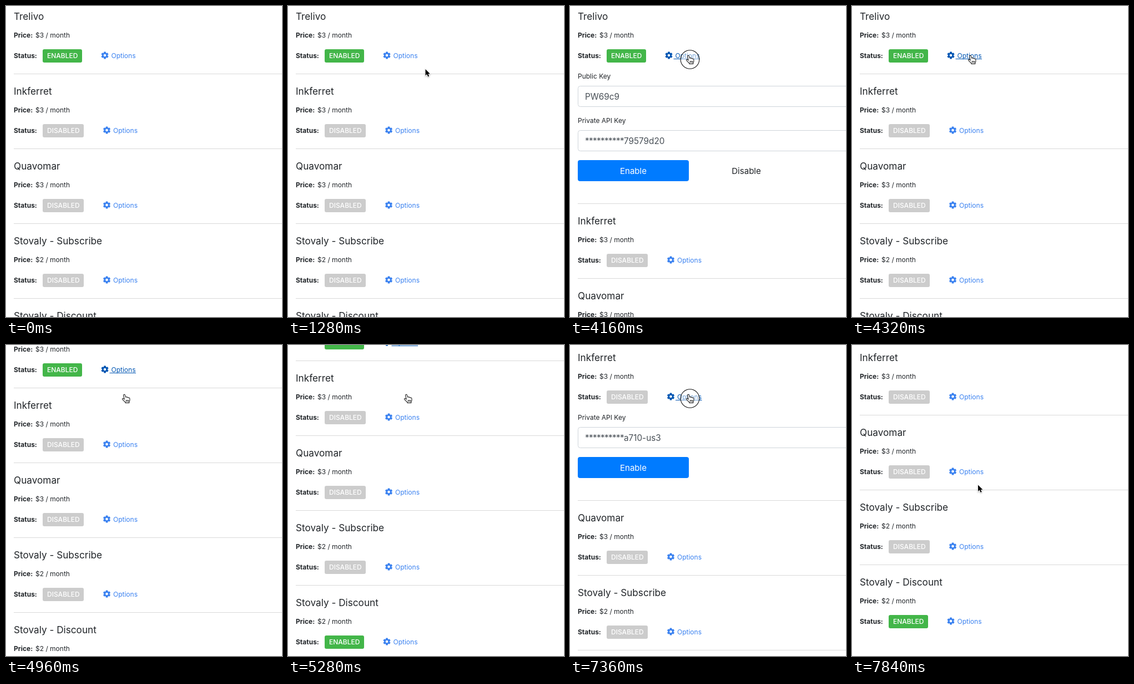
These frames come from a looping animation (497 by 561 pixels, 8 s). An HTML page:

```html
<!DOCTYPE html>
<html lang="en">
<head>
<meta charset="utf-8">
<title>Integration settings</title>
<style>
  html, body { margin: 0; width: 100%; height: 100%; overflow: hidden; background: #fff; }
  svg { display: block; font: 12px Inter, "Open Sans", sans-serif; fill: #212529; }
  .title { font-size: 17.2px; }
  .bold { font-weight: 700; }
  .badge { fill: #fff; font-weight: 500; }
  .value { font-size: 15.3px; fill: #495057; }
  .button { font-size: 15.1px; text-anchor: middle; }
  .link { fill: #3b82f0; }
  .link.hover { fill: #0056b3; }
  .rule { fill: #d9d9d9; }
  .field { fill: #fff; stroke: #ced4da; }
  .arrow { stroke: #fff; stroke-width: 1.6; paint-order: stroke; fill: #000;
           filter: drop-shadow(0 1px .8px rgba(0,0,0,.3)); }
  .hand { fill: #fff; stroke: #222; stroke-width: 1.1; stroke-linejoin: round; }
  .click { fill: rgba(255,255,255,.45); stroke: #111; stroke-width: 1.1; }
</style>
</head>
<body>
<svg id="stage" width="497" height="561" viewBox="0 0 497 561"></svg>
<script>
const LOOP = 8000;
const ROW_HEIGHT = 135;
const stage = document.getElementById('stage');

const rows = [
  { name: 'Trelivo', price: 3, enabled: true, extra: 234 },
  { name: 'Inkferret', price: 3, extra: 154 },
  { name: 'Quavomar', price: 3 },
  { name: 'Stovaly - Subscribe', price: 2 },
  { name: 'Stovaly - Discount', price: 2, enabled: true }
];

// Each step changes only the listed parts of the state.
const steps = [
  [0, { scroll: 0, open: -1, hover: -1, cursor: null, at: [0, 0], click: null }],
  [160, { cursor: 'arrow', at: [140, 236] }],
  [320, { at: [116, 158] }],
  [480, { at: [117, 157] }],
  [640, { at: [242, 113] }],
  [800, { at: [246.5, 113] }],
  [1120, { click: [252, 119.5] }],
  [1280, { click: null }],
  [1440, { at: [211, 88], hover: 0 }],
  [1600, { cursor: 'hand', at: [208, 88] }],
  [1920, { click: [216, 96.5] }],
  [2080, { click: null, open: 0 }],
  [4160, { click: [216, 96.5] }],
  [4320, { click: null, open: -1 }],
  [4960, { scroll: 45 }],
  [5120, { scroll: 76 }],
  [5280, { scroll: 94 }],
  [5440, { hover: -1 }],
  [5600, { scroll: 131 }],
  [5760, { hover: 1 }],
  [6400, { open: 1 }],
  [7360, { click: [216, 96.5] }],
  [7520, { click: null, open: -1 }],
  [7680, { cursor: 'arrow', at: [217, 126] }],
  [7840, { at: [226, 251.5], hover: -1 }]
];

const text = (x, y, content, style = '') =>
  `<text x="${x}" y="${y}" class="${style}">${content}</text>`;

const box = (x, y, w, h, r, attrs) =>
  `<rect x="${x}" y="${y}" width="${w}" height="${h}" rx="${r}" ${attrs}/>`;

const group = (x, y, content) => `<g transform="translate(${x} ${y})">${content}</g>`;

function gear(x, y) {
  const teeth = [0, 60, 120].map(angle =>
    box(-1.9, -6.6, 3.8, 13.2, 0.7, `transform="rotate(${angle})"`)).join('');
  return group(x, y, teeth + '<circle r="5"/><circle r="2.3" fill="#fff"/>');
}

function options(x, hovered) {
  const underline = hovered ? box(x + 15, 95, 47.5, 1, 0, '') : '';
  return `<g class="link${hovered ? ' hover' : ''}">` +
    gear(x + 6.5, 89) + text(x + 18, 94, 'Options') + underline + '</g>';
}

function field(y, label, tail, masked) {
  const stars = Array.from({ length: 10 }, (_, i) => 27 + 7 * i).join(' ');
  return text(14, y, label) +
    box(14.5, y + 13.5, 520, 37, 4, 'class="field"') +
    (masked ? text(stars, y + 38, '*'.repeat(10), 'value') : '') +
    text(masked ? 97 : 27, y + 38, tail, 'value');
}

const enableButton = y =>
  box(14, y, 200, 38, 4, 'fill="#007bff"') +
  `<g fill="#fff">${text(114, y + 25, 'Enable', 'button')}</g>`;

const panels = [
  () => field(131, 'Public Key', 'PW69c9') +
    field(211, 'Private API Key', '79579d20', true) +
    enableButton(278) + text(317.5, 303, 'Disable', 'button'),
  () => field(131, 'Private API Key', 'a710-us3', true) + enableButton(198)
];

function rowMarkup(row, index, state) {
  const isOpen = state.open === index;
  const isLast = index === rows.length - 1;
  const [label, width, color, linkX] = row.enabled
    ? ['ENABLED', 71, '#43b649', 171.5]
    : ['DISABLED', 74, '#ccc', 175];
  return text(14, 25, row.name, 'title') +
    text(14, 57, 'Price:', 'bold') + text(53, 57, `$${row.price} / month`) +
    text(14, 94, 'Status:', 'bold') +
    box(66, 78, width, 24, 3, `fill="${color}"`) + text(74, 94, label, 'badge') +
    options(linkX, state.hover === index) +
    (isOpen ? panels[index]() : '') +
    (isLast ? '' : box(14, 122 + (isOpen ? row.extra : 0), 483, 1, 0, 'class="rule"'));
}

const cursors = {
  arrow: '<path class="arrow" d="M1 1V12.6L3.7 10.1L5.6 14.4L7.6 13.5L5.8 9.4H9.4Z"/>',
  hand: '<path class="hand" d="M5.2 10.2L3.5 3.2Q3.3 1.6 4.5 1.2Q5.8 .9 6.3 2.3L7.5 6.2' +
    'Q7.8 5.3 8.8 5.5T10 6.7Q10.4 5.9 11.4 6.2T12.4 7.4Q13.1 6.7 14 7.3T14.9 9V11.4' +
    'Q14.7 13 13.8 14.2V16.4H6.8V15Q4.2 12.8 2 10.6Q.9 9.2 1.9 8.4T5.2 10.2Z"/>' +
    '<path class="hand" d="M8.4 11v3.2M10.4 11v3.2M12.4 11v3.2"/>'
};

function draw(state) {
  let y = -state.scroll;
  let markup = '';
  rows.forEach((row, index) => {
    markup += group(0, y, rowMarkup(row, index, state));
    y += ROW_HEIGHT + (state.open === index ? row.extra : 0);
  });
  if (state.click) markup += group(...state.click, '<circle class="click" r="16.8"/>');
  if (state.cursor) markup += group(...state.at, cursors[state.cursor]);
  stage.innerHTML = markup;
}

let shown = 0;
function update(now) {
  const time = now % LOOP;
  const passed = steps.filter(([start]) => start <= time);
  if (passed.length !== shown) {
    shown = passed.length;
    draw(Object.assign({}, ...passed.map(([, change]) => change)));
  }
}

const origin = performance.now();
function tick() {
  update(performance.now() - origin);
  requestAnimationFrame(tick);
}
tick();
</script>
</body>
</html>
```
